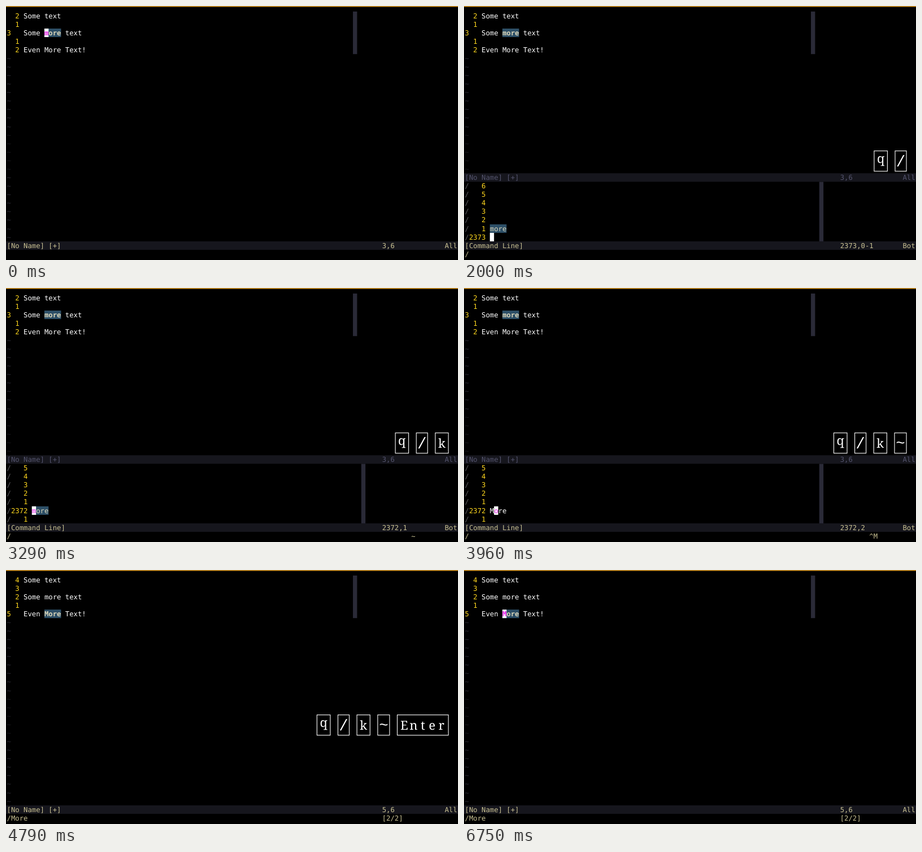
Write an HTML page that moves like this. It is 800 by 450 pixels and loops after 9830 ms.

```html
<!DOCTYPE html>
<html lang="en">
<head>
<meta charset="utf-8">
<title>Search history window</title>
<style>
  html, body { margin: 0; width: 100%; height: 100%; overflow: hidden; background: #000; }
  svg { display: block; width: 800px; height: 450px; }
  text { text-rendering: geometricPrecision; }
  .mono { font: 12.26px "DejaVu Sans Mono", monospace; }
  .bold { font-weight: bold; }
  .slab { font: 22px "Noto Serif", serif; }
  .sign { font: 27.5px "Liberation Mono", monospace; }
</style>
</head>
<body>
<svg id="stage" viewBox="0 0 800 450"></svg>
<script>
const LOOP = 9830, TICK = 1000 / 24;
const CW = 7.38, LH = 15.08, LEFT = 1.5, TOP = 9.8;
const C = {
  fg: '#ffffff', number: '#ffd71e', bar: '#16161d', barText: '#c8c093', barDim: '#54546d',
  column: '#2a2a37', match: '#2d4f67', matchText: '#dcd7ba', cursorText: '#e81ee8',
  tilde: '#2a2a33', tildeDim: '#18181d', slash: '#5c5c60', edge: '#d9971f'
};
const stage = document.getElementById('stage');

const colX = c => LEFT + c * CW;
const rowY = r => TOP + r * LH;
const rect = (x, y, w, h, fill) =>
  `<rect x="${x}" y="${y}" width="${w}" height="${h}" fill="${fill}"/>`;
const cells = (c, r, w, h, fill) => rect(colX(c), rowY(r), w * CW, h * LH, fill);
const type = (c, r, s, fill = C.fg, bold = false) =>
  `<text class="mono${bold ? ' bold' : ''}" x="${colX(c)}" y="${rowY(r) + 11.7}" fill="${fill}">${s}</text>`;
const found = (c, r, s, bold) =>
  cells(c, r, s.length, 1, C.match) + type(c, r, s, C.matchText, bold);

// Fades run linearly between [time, opacity] points; equal times make a jump.
const BLINK = [
  [0, 1], [3125, 1], [3290, 0.2], [3290, 1], [4540, 1], [4790, 0],
  [5290, 0], [5500, 1], [6085, 1], [6330, 0], [6540, 0], [6750, 1], [LOOP, 1]
];
function cursorAlpha(t) {
  const i = BLINK.findIndex((p, n) => n > 0 && t < p[0]);
  if (i < 0) return 1;
  const [t0, a0] = BLINK[i - 1], [t1, a1] = BLINK[i];
  return a0 + (a1 - a0) * (t - t0) / (t1 - t0);
}
function cursor(t, c, r, ch = '', bold = false) {
  return `<g opacity="${cursorAlpha(t).toFixed(3)}">` +
    cells(c, r, 1, 1, C.fg) + type(c, r, ch, C.cursorText, bold) + '</g>';
}

function statusLine(r, name, pos, where, fill) {
  return rect(0, rowY(r), 800, LH, C.bar) +
    type(0, r, name, fill) + type(90, r, pos, fill) + type(105, r, where, fill);
}

function mainWindow(current, lastRow) {
  let s = cells(83, 0, 1, 5, C.column);
  for (let r = 0; r < 5; r++) {
    s += r === current ? type(0, r, r + 1, C.number)
                       : type(2, r, Math.abs(r - current), C.number);
  }
  s += type(4, 0, 'Some text');
  if (current === 2) {
    s += type(4, 2, 'Some') + found(9, 2, 'more', true) + type(14, 2, 'text') +
      type(4, 4, 'Even More Text!');
  } else {
    s += type(4, 2, 'Some more text') +
      type(4, 4, 'Even') + found(9, 4, 'More', true) + type(14, 4, 'Text!');
  }
  for (let r = 5; r <= lastRow; r++) {
    s += type(0, r, '~', r >= 14 && r <= 18 ? C.tildeDim : C.tilde);
  }
  return s;
}

function historyWindow(t) {
  const moved = t >= 2500, edited = t >= 3330;
  const current = moved ? 25 : 26;
  let s = cells(85, 20, 1, 7, C.column);
  for (let r = 20; r <= 26; r++) {
    s += type(0, r, '/', C.slash);
    s += r === current ? type(1, r, 2347 + r, C.number)
                       : type(4, r, Math.abs(r - current), C.number);
  }
  s += edited ? type(6, 25, 'More') : found(6, 25, 'more', false);
  if (edited) s += cursor(t, 7, 25, 'o');
  else if (moved) s += cursor(t, 6, 25, 'm');
  else s += cursor(t, 6, 26);
  const pos = edited ? '2372,2' : moved ? '2372,1' : '2373,0-1';
  return s + statusLine(19, '[No Name] [+]', '3,6', 'All', C.barDim) +
    statusLine(27, '[Command Line]', pos, 'Bot', C.barText) + type(0, 28, '/', C.barText);
}

const KEYS = [
  { at: 1750, label: 'q', width: 23.5, base: 277.7, font: 'slab' },
  { at: 2000, label: '/', width: 20, base: 283.5, font: 'sign' },
  { at: 2500, label: 'k', width: 23.2, base: 283, font: 'slab' },
  { at: 3330, label: '~', width: 21, base: 282.5, font: 'sign' },
  { at: 3960, label: 'Enter', width: 90.5, base: 282.5, font: 'slab' }
];
function keyCaps(t) {
  if (t >= 5750) return '';
  let right = 783, s = '';
  for (const k of KEYS.filter(k => t >= k.at).reverse()) {
    const x = right - k.width, mid = x + k.width / 2, n = k.label.length;
    const xs = [...k.label].map((_, i) => mid + (i - (n - 1) / 2) * 16.5);
    s += `<rect x="${x}" y="256.7" width="${k.width}" height="36" fill="none" stroke="#fff" stroke-width="1.1"/>` +
      `<text class="${k.font}" x="${xs.join(' ')}" y="${k.base}" fill="#fff" text-anchor="middle">${k.label}</text>`;
    right = x - 13.6;
  }
  return s;
}

// Pending command shown at the right of the last line.
function pending(t) {
  const shown = [[1750, 2000, 'q'], [3290, 3330, '~'], [3920, 4000, '^M']]
    .find(([from, to]) => t >= from && t < to);
  return shown ? type(97, 28, shown[2], C.barText) : '';
}

function draw(t) {
  const open = t >= 2000 && t < 4000, done = t >= 4000;
  let s = rect(0, 0, 800, 450, '#000') + rect(0, 0, 800, 1.5, C.edge);
  s += mainWindow(done ? 4 : 2, open ? 18 : 26);
  if (open) {
    s += historyWindow(t);
  } else {
    s += statusLine(27, '[No Name] [+]', done ? '5,6' : '3,6', 'All', C.barText);
    s += done ? cursor(t, 9, 4, 'M', true) : cursor(t, 9, 2, 'm', true);
    if (done) s += type(0, 28, '/More', C.barText) + type(90, 28, '[2/2]', C.barText);
  }
  stage.innerHTML = s + pending(t) + keyCaps(t);
}

const start = performance.now();
let last = -1;
function loop() {
  const t = (performance.now() - start) % LOOP;
  const tick = Math.floor(t / TICK + 0.05);
  if (tick !== last) {
    last = tick;
    draw(Math.min(tick * TICK + 0.01, LOOP - 1));
  }
  requestAnimationFrame(loop);
}
loop();
</script>
</body>
</html>
```
